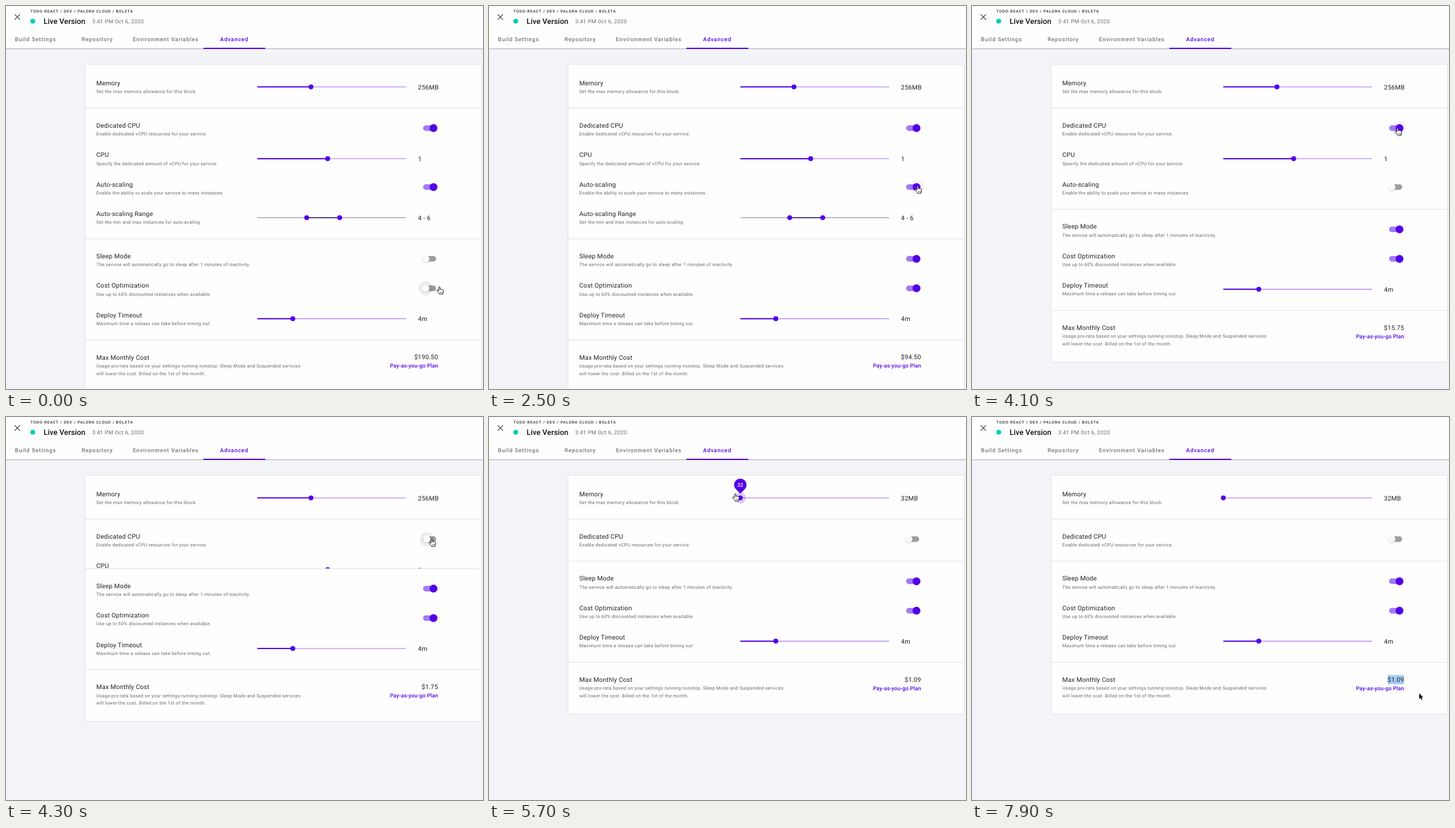
An HTML page for the animation above (8 s loop, 800 by 642 pixels).

```html
<!DOCTYPE html>
<html lang="en">
<head>
<meta charset="utf-8">
<title>Service settings</title>
<style>
  html, body { margin: 0; height: 100%; overflow: hidden; background: #f2f4f7; }
  svg { display: block; }
  text { font-family: Roboto, sans-serif; text-rendering: geometricPrecision; fill: #202024; }
  .title { font-size: 10.6px; letter-spacing: .22px; }
  .note { font-size: 7.77px; letter-spacing: .26px; fill: #68686c; }
  .tab { font-size: 9.3px; letter-spacing: .8px; font-weight: 500; fill: #757578; }
  .crumb { font-size: 6.3px; letter-spacing: .95px; font-weight: 500; }
  .name { font-size: 12.7px; letter-spacing: .05px; font-weight: 500; fill: #111; }
  .date { font-size: 9.06px; letter-spacing: .3px; fill: #68686c; }
  .link { font-size: 9.06px; letter-spacing: .12px; font-weight: 500; }
  .pin { font-size: 8.6px; font-weight: 500; fill: #fff; }
  .end { text-anchor: end; }
  .mid { text-anchor: middle; }
  .active { fill: #5300e8; }
</style>
</head>
<body>
<svg id="stage" width="800" height="642" viewBox="0 0 800 642"></svg>
<script>
const LOOP = 8000, STEP = 100;
const PURPLE = '#5300e8', LIGHT = '#b48df3', WHITE = '#fefeff', EDGE = '#e0e0e5';
const TRACK_START = 421.5, TRACK_END = 671;

// time, tip x, tip y, shape from this time on
const pointer = [
  [0, 727, 471, 'hand'], [50, 727, 471, 'arrow'], [300, 686, 593, 'hand'], [400, 686, 593, 'arrow'],
  [700, 711, 472, 'hand'], [900, 711, 472, 'arrow'], [1200, 711, 425, 'hand'], [1300, 711, 425, 'hand'],
  [1400, 711, 426, 'hand'], [1900, 711, 426, 'arrow'], [2400, 719, 303, 'hand'], [2500, 719, 302, 'hand'],
  [3000, 719, 302, 'arrow'], [3600, 714, 573, 'arrow'], [3700, 714, 573, 'arrow'], [4050, 714, 207, 'hand'],
  [4100, 714, 205, 'hand'], [4350, 714, 205, 'arrow'], [4900, 504, 130, 'hand'], [5000, 502.5, 129, 'hand'],
  [5100, 502.5, 129, 'hand'], [5700, 413, 129, 'hand'], [5850, 413, 130, 'arrow'], [6500, 638, 389, 'arrow'],
  [6950, 702, 441, 'beam'], [7200, 697, 440, 'beam'], [7350, 697, 440, 'beam'], [7600, 725, 440, 'arrow'],
  [7900, 750, 463, 'arrow']
];

const shapes = {
  hand: `<path d="M-1.2 .8c0-1.6 2.2-1.6 2.2 0v3.4c.2-1 2-.9 2 .2 .3-.8 1.9-.6 1.9 .5 .4-.7 1.6-.4 1.6 .6v2.5c0 1.5-1 2.2-1 4h-5.6c0-1.6-3.9-4-4.3-5.8-.2-1.4 1.5-1.7 2.2-.6l1 1.2z"
    fill="#fff" stroke="#111" stroke-width=".95"/><path d="M1.2 8v2.4M3 8v2.4M4.7 8v2.4" stroke="#111" stroke-width=".6"/>`,
  arrow: `<path d="M0 0v9.8l2.2-2 1.6 3.7 1.6-.7-1.6-3.6h3.1z" fill="#111" stroke="#fff" stroke-width=".9" paint-order="stroke"/>`,
  beam: `<path d="M-2-6q2 0 2 1.5V4.5Q0 6-2 6M2-6q-2 0-2 1.5M2 6q-2 0-2-1.5" fill="none" stroke="#222" stroke-width=".9"/>`
};

const progress = (t, start, length) => Math.min(1, Math.max(0, (t - start) / length));
const easeOut = p => 1 - (1 - p) ** 3;
const during = (t, from, to) => t >= from && t < to;
const smooth = p => p * p * (3 - 2 * p);

const text = (x, y, style, s) => `<text x="${x}" y="${y}" class="${style}">${s}</text>`;
const line = (x1, x2, y, color, width = 1) =>
  `<path d="M${x1} ${y}H${x2}" stroke="${color}" stroke-width="${width}"/>`;
const dot = (x, y, r, fill, extra = '') => `<circle cx="${x}" cy="${y}" r="${r}" fill="${fill}" ${extra}/>`;
const card = (y, height) =>
  `<rect x="132.5" y="${y}" width="665" height="${height}" rx="1.5" fill="${WHITE}" stroke="${EDGE}"/>`;

const row = (y, title, note) => text(151.5, y + 4, 'title', title) + text(151.5, y + 17.2, 'note', note);

function slider(y, x, value) {
  return line(TRACK_START, TRACK_END, y, LIGHT, 1.4) + line(TRACK_START, x, y, PURPLE, 2) +
    dot(x, y, 4.1, PURPLE) + text(691, y + 3.9, 'title', value);
}

function rangeSlider(y, low, high, value) {
  return line(TRACK_START, TRACK_END, y, '#aca5ba', 1.4) + line(low, high, y, '#2d0f78', 1.6) +
    dot(low, y, 4.1, PURPLE) + dot(high, y, 4.1, PURPLE) + text(691, y + 3.9, 'title', value);
}

// on: 0 to 1
function toggle(y, on, halo) {
  const x = 704 + 13 * on, lit = on > .5;
  return `<rect x="699.5" y="${y - 4.7}" width="22" height="9.4" rx="4.7" fill="${lit ? '#a37bf3' : '#9e9e9e'}"/>` +
    (halo ? dot(x, y, 12, lit ? PURPLE : '#000', `opacity="${lit ? .05 : .07}"`) : '') +
    (lit ? '' : dot(x, y + .6, 6.4, '#000', 'opacity=".16"')) +
    dot(x, y, lit ? 6.6 : 6.1, lit ? PURPLE : '#fafafa');
}

function pin(x, y, value, scale) {
  return dot(x, y, 9.5 * scale, PURPLE, 'opacity=".2"') +
    `<g transform="translate(${x} ${y - 7.2}) scale(${scale})">
      <path d="M0 0L-7.4-7.4A10.4 10.4 0 1 1 7.4-7.4Z" fill="${PURPLE}"/>
      ${text(0, -11.6, 'pin mid', value)}</g>`;
}

function cursor(t) {
  const i = pointer.findLastIndex(key => key[0] <= t);
  const [t0, x0, y0, shape] = pointer[i];
  const [t1, x1, y1] = pointer[i + 1] || [LOOP, x0, y0];
  const p = smooth(progress(t, t0, t1 - t0));
  return `<g transform="translate(${x0 + (x1 - x0) * p} ${y0 + (y1 - y0) * p})">${shapes[shape]}</g>`;
}

const header = `<path d="M0 0H800V71H0Z" fill="${WHITE}"/>` + line(0, 800, 71.5, '#b9b9bc') +
  line(0, 800, 72.5, '#e4e5e8') + line(331, 435, 71, PURPLE, 2) +
  '<path d="M14.5 14l9 9m0-9l-9 9" stroke="#555" stroke-width="1.3"/>' + dot(44.8, 25.5, 4.1, '#00cdb8') +
  text(41, 10.8, 'crumb', 'TODO-REACT / DEV / PALDRA CLOUD / BOLETA') +
  text(63, 30, 'name', 'Live Version') + text(144.5, 28.7, 'date', '3:41 PM Oct 6, 2020') +
  text(15, 59, 'tab', 'Build Settings') + text(126.7, 59, 'tab', 'Repository') +
  text(212.7, 59, 'tab', 'Environment Variables') + text(359, 59, 'tab active', 'Advanced');

function render(t) {
  const drag = smooth(progress(t, 5100, 600));
  const memory = 2 ** Math.round(8 - 3 * drag);
  const memoryX = 511.5 - 90 * drag;
  const pinScale = easeOut(progress(t, 4800, 200)) * (1 - progress(t, 5850, 150));
  const scaleOff = easeOut(progress(t, 2750, 300));
  const cpuOff = easeOut(progress(t, 4150, 300));
  const lift = 49.4 * scaleOff + 99.1 * cpuOff;
  const cost = t < 800 ? 190.5 : t < 2850 ? 94.5 : t < 4250 ? 15.75 : .9957 + .002946 * memory;
  const selected = 27.5 * progress(t, 7350, 250);

  const upper = card(97.5, 293) + line(133, 797, 171, EDGE) +
    row(129, 'Memory', 'Set the max memory allowance for this block.') +
    slider(135.6, memoryX, memory + 'MB') +
    (pinScale ? pin(memoryX, 135.6, memory, pinScale) : '') +
    row(199.8, 'Dedicated CPU', 'Enable dedicated vCPU resources for your service.') +
    toggle(204.7, 1 - cpuOff, during(t, 4000, 4500)) +
    row(249.3, 'CPU', 'Specify the dedicated amount of vCPU for your service.') +
    slider(255.9, 539.5, '1') +
    row(298.7, 'Auto-scaling', 'Enable the ability to scale your service to many instances.') +
    toggle(303.5, 1 - scaleOff, during(t, 2400, 3100)) +
    row(348.1, 'Auto-scaling Range', 'Set the min and max instances for auto-scaling.') +
    rangeSlider(354.8, 504.3, 559.7, '4 - 6');

  const lower = card(390.3, 256) + line(133, 797, 559.7, EDGE) +
    row(418.9, 'Sleep Mode', 'The service will automatically go to sleep after 1 minutes of inactivity.') +
    toggle(423.8, easeOut(progress(t, 1650, 250)), during(t, 1200, 2000)) +
    row(468.3, 'Cost Optimization', 'Use up to 60% discounted instances when available.') +
    toggle(473.2, easeOut(progress(t, 750, 250)), t < 1000) +
    row(517.7, 'Deploy Timeout', 'Maximum time a release can take before timing out.') +
    slider(524.2, 481, '4m') +
    row(588.5, 'Max Monthly Cost',
      'Usage pro-rata based on your settings running nonstop. Sleep Mode and Suspended services') +
    text(151.5, 618.5, 'note', 'will lower the cost. Billed on the 1st of the month.') +
    `<rect x="697" y="581" width="${selected}" height="15.5" fill="#a9cdf6"/>` +
    text(724.7, 592.3, 'title end', '$' + cost.toFixed(2)) +
    text(724.7, 606.4, 'link active end', 'Pay-as-you-go Plan');

  return header + upper + `<g transform="translate(0 ${-lift})">${lower}</g>` + cursor(t);
}

const stage = document.getElementById('stage');
let shown = -1;
function tick() {
  const t = Math.floor(performance.now() % LOOP / STEP) * STEP;
  if (t !== shown) stage.innerHTML = render(shown = t);
  requestAnimationFrame(tick);
}
tick();
</script>
</body>
</html>
```
